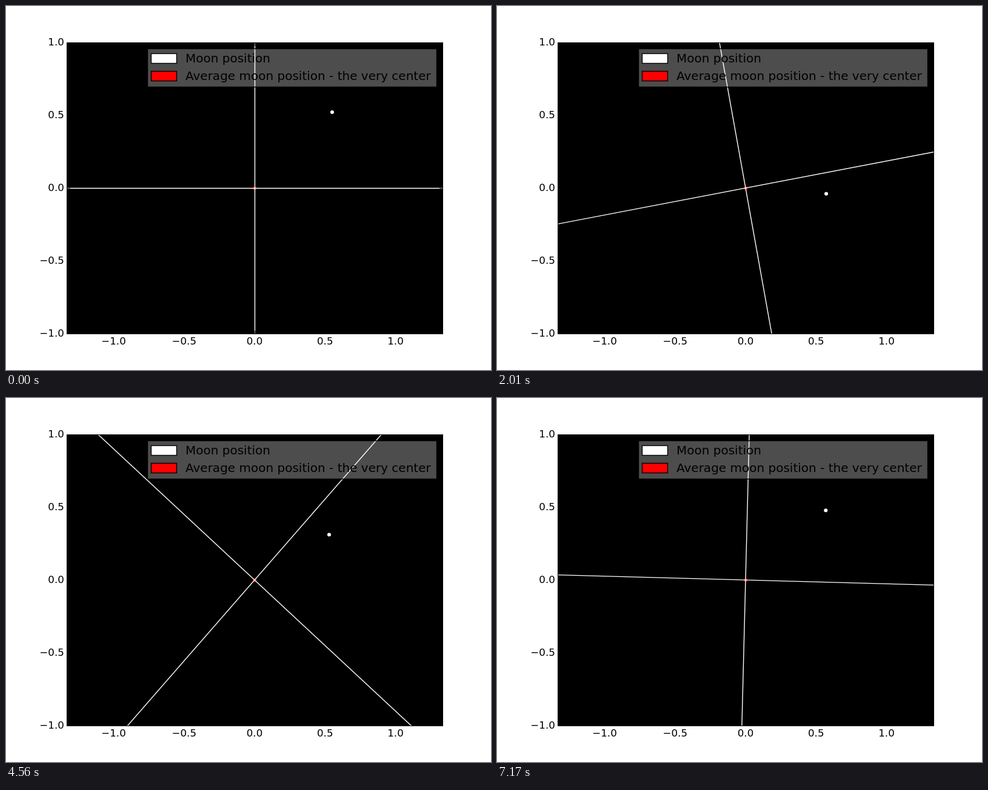
Write an HTML page with a canvas that moves like this. It is 800 by 600 pixels and loops after 7200 ms.

```html
<!DOCTYPE html>
<html lang="en">
<head>
<meta charset="utf-8">
<title>Moon position</title>
<style>
  html, body { margin: 0; width: 100%; height: 100%; overflow: hidden; background: #fff; }
  canvas { display: block; }
</style>
</head>
<body>
<canvas id="plot" width="800" height="600"></canvas>
<script>
const ctx = document.getElementById('plot').getContext('2d');
const STEPS = 240, STEP_MS = 30;
const CX = 410, CY = 300, SX = 232.5, SY = 240;
const PT = 100 / 72;
const FONT = '"DejaVu Sans", sans-serif';
const STEP_ANGLE = 2 * Math.PI / STEPS;

// Points on the moon's path: step, x, y. It circles about three times per turn of the cross.
const path = [
  [0, 538, 175], [39, 333.6, 388.2], [95, 323, 156.3], [129, 435, 468],
  [175, 305, 207.6], [206, 399.4, 513], [239, 542.3, 185.3]
];

function rotate([x, y], a) {
  const c = Math.cos(a), s = Math.sin(a);
  return [x * c - y * s, x * s + y * c];
}

// The same points with the mean orbital motion taken out.
const knots = path.map(([k, x, y]) => {
  const p = rotate([(x - CX) / SX, (CY - y) / SY], -3 * k * STEP_ANGLE);
  return { k, p };
});

function knot(i) {
  const n = knots.length, turn = Math.floor(i / n), q = knots[i - turn * n];
  return { k: q.k + turn * STEPS, p: q.p };
}

function slope(i, axis) {
  const a = knot(i - 1), b = knot(i), c = knot(i + 1);
  const h0 = b.k - a.k, h1 = c.k - b.k;
  const d0 = (b.p[axis] - a.p[axis]) / h0, d1 = (c.p[axis] - b.p[axis]) / h1;
  return (d0 * h1 + d1 * h0) / (h0 + h1);
}

function moonAt(step) {
  let i = 0;
  while (knot(i + 1).k <= step) i++;
  const a = knot(i), b = knot(i + 1), h = b.k - a.k, u = (step - a.k) / h;
  const p = [0, 1].map(axis => {
    const m0 = slope(i, axis) * h, m1 = slope(i + 1, axis) * h;
    const w = u * u * (3 - 2 * u);
    return a.p[axis] * (1 - w) + b.p[axis] * w
      + m0 * u * (1 - u) * (1 - u) - m1 * u * u * (1 - u);
  });
  const [x, y] = rotate(p, 3 * step * STEP_ANGLE);
  return [CX + x * SX, CY - y * SY];
}

function line(x0, y0, x1, y1, color, width) {
  ctx.strokeStyle = color;
  ctx.lineWidth = width;
  ctx.beginPath();
  ctx.moveTo(x0, y0);
  ctx.lineTo(x1, y1);
  ctx.stroke();
}

function dot(x, y, r, color) {
  ctx.fillStyle = color;
  ctx.beginPath();
  ctx.arc(x, y, r, 0, 2 * Math.PI);
  ctx.fill();
}

function box(x, y, w, h, fill) {
  ctx.fillStyle = fill;
  ctx.fillRect(x, y, w, h);
  ctx.strokeStyle = '#000';
  ctx.lineWidth = PT;
  ctx.strokeRect(x, y, w, h);
}

function text(str, x, y, size, align) {
  ctx.fillStyle = '#000';
  ctx.font = size + 'px ' + FONT;
  ctx.textAlign = align;
  ctx.fillText(str, x, y);
}

function drawCross(step) {
  const snap = step % 60 === 0 ? 0.5 : 0;
  for (const quarter of [0, Math.PI / 2]) {
    const [x, y] = rotate([3, 0], step * STEP_ANGLE + quarter);
    const dx = x * SX, dy = -y * SY;
    line(CX + snap - dx, CY + snap - dy, CX + snap + dx, CY + snap + dy, '#fff', PT);
  }
}

function drawTicks() {
  const len = 4 * PT, thin = PT / 2;
  line(CX + 0.5, 60, CX + 0.5, 60.5 + len, '#000', thin);
  line(CX + 0.5, 540.5 - len, CX + 0.5, 541, '#000', thin);
  line(100, CY + 0.5, 100.5 + len, CY + 0.5, '#000', thin);
  line(720.5 - len, CY + 0.5, 721, CY + 0.5, '#000', thin);
}

function drawLabels() {
  const size = 12 * PT;
  const label = v => (v < 0 ? '\u2212' : '') + Math.abs(v).toFixed(1);
  for (let v = -1; v <= 1; v += 0.5) {
    text(label(v), CX + v * SX, 558, size, 'center');
    text(label(v), 95.8, 305 - v * SY, size, 'right');
  }
}

function drawLegend() {
  box(233.5, 70.5, 477, 63, 'rgba(255,255,255,0.3)');
  box(239.5, 78.5, 42, 16, '#fff');
  box(239.5, 107.5, 42, 16, '#f00');
  text('Moon position', 296, 93, 20, 'left');
  text('Average moon position - the very center', 296, 122, 20, 'left');
}

function draw(step) {
  ctx.fillStyle = '#fff';
  ctx.fillRect(0, 0, 800, 600);
  ctx.fillStyle = '#000';
  ctx.fillRect(100, 60, 621, 481);

  ctx.save();
  ctx.beginPath();
  ctx.rect(101, 61, 619, 479);
  ctx.clip();
  dot(CX + 0.3, CY + 0.3, 2.8, '#f00');
  drawCross(step);
  const [mx, my] = moonAt(step);
  dot(mx, my, 3, '#fff');
  ctx.restore();

  drawTicks();
  drawLabels();
  drawLegend();
}

const start = performance.now();
function tick() {
  const t = Math.max(0, performance.now() - start);
  draw(Math.floor(t / STEP_MS) % STEPS);
  requestAnimationFrame(tick);
}
tick();
</script>
</body>
</html>
```
